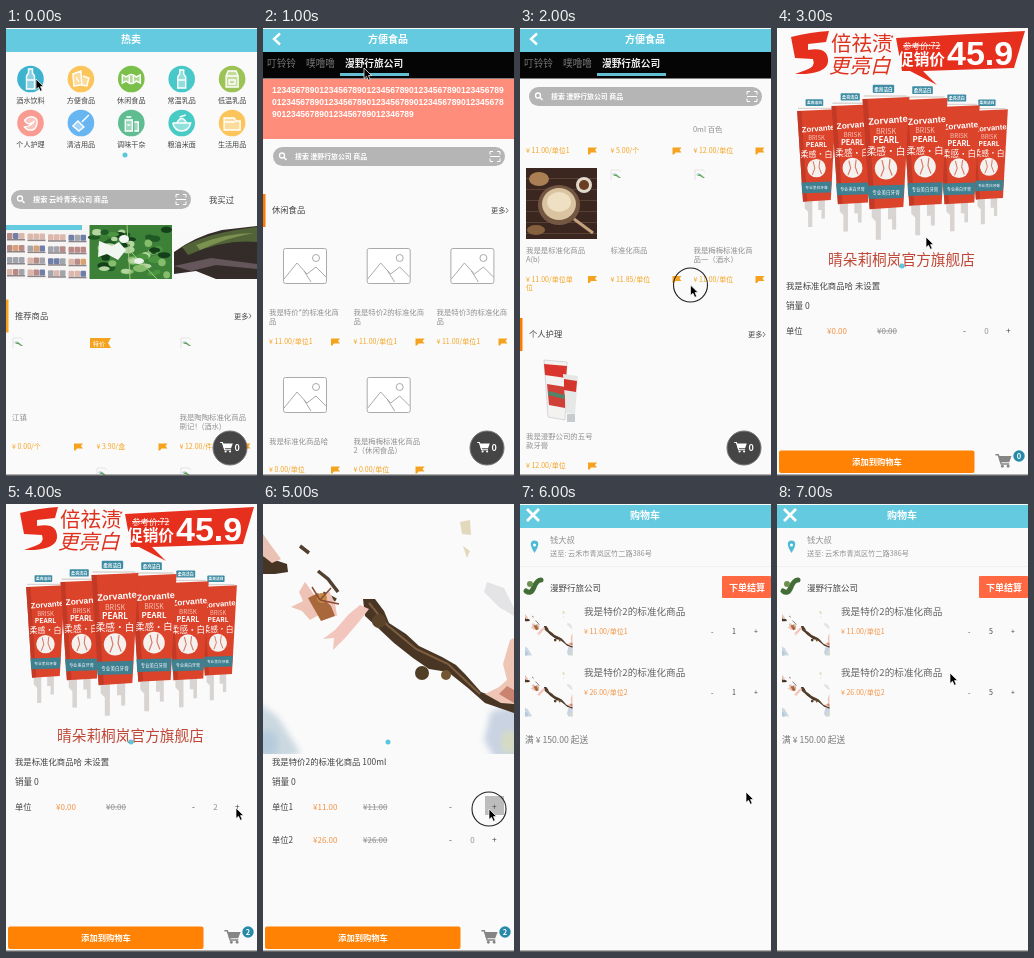
These frames come from a looping animation (251 px wide and 448 px high, 8000 ms). An HTML page:

```html
<!DOCTYPE html>
<html lang="zh">
<head>
<meta charset="utf-8">
<style>
html, body { margin: 0; width: 100%; height: 100%; overflow: hidden; background: #fafafa; }
svg { display: block; width: 100%; height: 100%; }
text { font-family: "Noto Sans CJK SC", "Noto Sans CJK", sans-serif; white-space: pre; }
.b { font-weight: 700; }
.m { text-anchor: middle; }
.s { text-decoration: line-through; }
.i { font-style: italic; }
.arial { font-family: "Liberation Sans", sans-serif; font-weight: 700; }
</style>
</head>
<body>
<svg id="stage" viewBox="0 0 251 448" preserveAspectRatio="none"></svg>
<script>
const BLUE = '#63cae0', ORANGE = '#f5a31f', INK = '#444', GREY = '#909090';
const COLS = [6, 90.5, 173.5];
const SHOP = '漫野行旅公司';

const text = (x, y, s, size = 8.3, fill = INK, cls = '') =>
  `<text x="${x}" y="${y}" font-size="${size}" fill="${fill}" class="${cls}">${s}</text>`;
const rect = (x, y, w, h, fill, r = 0, more = '') =>
  `<rect x="${x}" y="${y}" width="${w}" height="${h}" rx="${r}" fill="${fill}" ${more}/>`;
const dot = (x, y, r, fill, more = '') => `<circle cx="${x}" cy="${y}" r="${r}" fill="${fill}" ${more}/>`;
const oval = (x, y, rx, ry, fill, more = '') =>
  `<ellipse cx="${x}" cy="${y}" rx="${rx}" ry="${ry}" fill="${fill}" ${more}/>`;
const fill = (d, color, more = '') => `<path d="${d}" fill="${color}" ${more}/>`;
const line = (d, color, w = 1, more = '') =>
  `<path d="${d}" fill="none" stroke="${color}" stroke-width="${w}" ${more}/>`;
const at = (x, y, s, k = 1) => `<g transform="translate(${x} ${y}) scale(${k})">${s}</g>`;
const range = (n, f) => Array.from({ length: n }, (_, i) => f(i)).join('');

// Small seeded generator for the textured pictures
function random(seed) {
  return () => (seed = (seed * 16807) % 2147483647) / 2147483647;
}

const cursor = (x, y) => at(x, y,
  fill('M0 0V10.5L2.5 8.3 4.3 12.3 6.2 11.4 4.5 7.6H7.6Z', '#000', 'stroke="#fff" stroke-width=".7"'));
const click = (x, y) => dot(x, y, 17, 'none', 'stroke="#222" stroke-width="1.1"') + cursor(x, y);
const trolley = (x, y, color, k = 1) => at(x, y,
  line('M-7-5H-4.500L-2 3H5', color, 1.2) + fill('M-4.500-4H7L5 1.500H-3Z', color) +
  dot(-1, 5, 1.2, color) + dot(4, 5, 1.2, color), k);
const flag = (x, y) => fill(`M${x} ${y}h9l-2 2.500 2 2.500h-6l-1.500 2h-1.500z`, ORANGE);
const broken = (x, y) => at(x, y,
  line('M0 10V0H8L10 2', '#d4d4d4', .6) + fill('M1 5Q3 1 6 5Z', '#b8d0e8') + fill('M2 6 5 4 10 8 8 8 5 6Z', '#63a858'));
const chevron = line('M17 5.500 11 11 17 16.500', '#fff', 2.4);
const cross = line('M7 5 19 17M19 5 7 17', '#fff', 2.8);

const header = (title, icon = '') =>
  rect(0, 1, 251, 23, BLUE) + icon + text(125, 15.3, title, 10, '#fff', 'b m');
const floatingCart = dot(224, 420, 17, '#454545', 'stroke="#777" stroke-width="1"') +
  trolley(220.500, 419, '#fff', .9) + text(228.500, 423.300, '0', 9, '#fff', 'b');

function search(x, y, w, shop, size) {
  const mid = y + 9.5, s = x + w - 10;
  return rect(x, y, w, 19, '#b5b5b5', 9.5) +
    dot(x + 9, mid - 1, 2.5, 'none', 'stroke="#fff" stroke-width="1.3"') +
    line(`M${x + 11} ${mid + 1}l2.500 2.500`, '#fff', 1.4) +
    text(x + 22, mid + 2.6, `搜索 ${shop} 商品`, size, '#fff', 'b') +
    line(`M${s - 5} ${mid - 2}v-3h3m4 0h3v3m0 4v3h-3m-4 0h-3v-3M${s - 5} ${mid}h10`, '#fff', 1);
}

const section = (y, title, color) => rect(0, y, 2.5, 33, color) +
  text(9, y + 19, title) + text(228, y + 19, '更多', 7.2) + line(`M243 ${y + 14}l2 2.500-2 2.500`, INK, .7);

const price = (col, y, s) => text(COLS[col], y, s, 7, ORANGE) + flag(COLS[col] + 62, y - 5.500);
const caption = (col, y, lines) =>
  lines.map((s, i) => text(COLS[col], y + i * 9, s, 7.4, GREY)).join('');

const tabs = rect(0, 24, 251, 26.5, '#050505') +
  text(4, 39, '叮铃铃', 9.7, '#777') + text(43, 39, '噗噜噜', 9.7, '#777') +
  text(82, 39, SHOP, 9.7, '#eee', 'b') + rect(77, 45, 69, 3, '#62bfd4');

const placeholder = (x, y) => at(x, y,
  rect(.5, .5, 43, 35, '#fff', 2, 'stroke="#aaa"') +
  line('M1 31 14 15 24 26 33 19 43 29M21 23 28 34', '#aaa') + dot(33, 10, 3.500, 'none', 'stroke="#aaa"'));

// Category glyphs, centred on the disc
const categories = [
  ['酒水饮料', '#3eb3cf', 'M-2-10H2V-6L4-3V10H-4V-3L-2-6ZM-4 1H4'],
  ['方便食品', '#fbc55c', 'M-8-5 0-8 1 6-7 7ZM2-3 8-1 6 7 1 6M-5-2 -2 3'],
  ['休闲食品', '#7cc04c', 'M-9-4-5-2Q0-7 5-2L9-4V4L5 2Q0 7-5 2L-9 4ZM-2-3V3M2-3V3'],
  ['常温乳品', '#48c8c8', 'M-2-9H2V-5L4-2V9H-4V-2L-2-5ZM-4 1H4'],
  ['低温乳品', '#9dc357', 'M-6-3-4-8H4L6-3V8H-6ZM-6-3H6M-3 1H3V5H-3Z'],
  ['个人护理', '#f99b91', 'M-6-3Q0-9 6-4 8 1 4 6-2 9-6 4 1 3 4-2-3 4-6-3'],
  ['清洁用品', '#67b5f1', 'M8-8 1-1M-3-2 3 4-2 8-8 3Z'],
  ['调味干杂', '#5fbd91', 'M-6-3H1V8H-6ZM-5-6H0M3-1H7V8H3M-4 2H-1'],
  ['粮油米面', '#47cbc4', 'M-9 0H9Q7 8 0 8T-9 0M-5 0Q0-9 5 0M-2-6 4-8'],
  ['生活用品', '#fbc55c', 'M-8-5H2L4-2H8V7H-8ZM-8-1H3']
];
const categoryGrid = categories.map(([name, color, d], i) => {
  const x = 24.5 + (i % 5) * 50.4, row = Math.floor(i / 5);
  return at(x, 51 + row * 44, dot(0, 0, 13.3, color) + line(d, '#fff', 1.4) + fill(d, '#fff', 'opacity=".4"')) +
    text(x, 74.500 + row * 44, name, 7.1, INK, 'm');
}).join('');

function shelves() {
  const r = random(41), colors = ['#b98a86', '#6f7fa8', '#d9a070', '#a3a5ad', '#dcb8ac'];
  return rect(0, 197, 82, 54, '#f6f5f4') + range(4, row => range(4, col => {
    const x = 1 + col * 20.5, y = 205 + row * 12;
    return range(3, i => rect(x + i * 6, y + col * .6, 5.5, 6, colors[Math.floor(r() * 5)], 1)) +
      rect(x, y + 6 + col * .6, 18, 1.5, '#8d8488');
  })) + rect(0, 197, 76, 5, BLUE);
}

function garden() {
  const r = random(9), greens = ['#1f5a24', '#4b9540', '#86bd6d', '#153f1b', '#b3d6a0'];
  return rect(83.500, 197, 82.500, 54, '#3d8038') + range(55, i => {
    const x = 88 + r() * 73, y = 201 + r() * 46;
    return oval(x, y, 3 + r() * 4, 2 + r() * 2, greens[i % 5]);
  }) + line('M121 197 124 251M125 224 151 251', '#a6c882', 1) +
    fill('M93 213 106 218 113 214 120 222 112 232 101 226 92 229Z', '#f2f6f0') +
    oval(118, 211, 5, 4, '#f4f6f4') + oval(133, 233, 5, 3, '#eef3ec');
}

const leafy = rect(167.500, 197, 83.500, 54, '#f9f9f9') +
  fill('M168 224Q190 208 216 202L251 198V251H210L190 243 168 246Z', '#342c29') +
  fill('M176 219Q204 204 251 199V214Q218 211 182 227Z', '#526337') +
  fill('M190 217Q220 205 248 205 220 210 194 222Z', '#7b9150') +
  fill('M168 238 205 230 251 236V241L210 237 185 243Z', '#64565a');

const home = () => header('热卖') + categoryGrid + dot(119, 127, 2.5, '#5bc7df') +
  search(5, 162, 180, '云岭青禾公司', 7.2) + text(203, 174.500, '我买过', 8.4) +
  shelves() + garden() + leafy + section(271.500, '推荐商品', ORANGE) +
  broken(7, 310) + broken(175, 310) + broken(91, 440) + broken(175, 440) +
  fill('M84 310H105L102 315 105 320H84Z', ORANGE) + text(87, 317.500, '特价', 6, '#fff') +
  caption(0, 392, ['江镇']) + caption(2, 392, ['我是陶陶标准化商品', '刷记！(酒水)']) +
  price(0, 421, '¥ 0.00/个') + price(1, 421, '¥ 3.90/盒') + price(2, 421, '¥ 12.00/件') +
  floatingCart + cursor(30, 51);

const digits = ['1234567890123456789012345678901234567890123456789',
  '0123456789012345678901234567890123456789012345678', '901234567890123456789012346789'];
const category = () => header('方便食品', chevron) + tabs + rect(0, 51, 251, 60, '#ff8d7b') +
  digits.map((s, i) => text(9, 65 + i * 12, s, 8.5, '#fff', 'arial')).join('') +
  search(10, 119, 232, SHOP, 6.9) + section(166, '休闲食品', '#ff7b00') +
  range(5, i => placeholder(20 + (i % 3) * 83.700, i < 3 ? 220 : 349)) +
  range(3, i => caption(i, 286.500, [`我是特价${['*', 2, 3][i]}的标准化商`, '品']) + price(i, 316, '¥ 11.00/单位1')) +
  caption(0, 415.500, ['我是标准化商品哈']) + caption(1, 415.500, ['我是梅梅标准化商品', '2（休闲食品）']) +
  price(0, 444, '¥ 0.00/单位') + price(1, 444, '¥ 0.00/单位') + floatingCart + cursor(101, 40);

const breakfast = rect(6, 140, 71, 71, '#3b2720') +
  range(6, i => rect(6, 150 + i * 11, 71, 1, '#5a4033')) +
  oval(39, 177, 21, 20, '#745743') + oval(39, 176, 17, 16, '#d9c3a0') + oval(39, 174, 12, 10, '#efe0c3') +
  oval(64, 157, 8, 8, '#e1d9cc') + oval(64, 157, 5, 5, '#6b3d22') +
  oval(19, 151, 10, 7, '#ab7f54') + line('M54 191 73 205', '#c3a27d', 3) + oval(16, 202, 9, 5, '#87613d');
const carton = fill('M24 332 47 334 45 392 28 389Z', '#f4f2f1', 'stroke="#c6cacc" stroke-width=".7"') +
  fill('M24 336 47 338 46 350 25 347Z', '#d9342d') + fill('M27 356 46 359 45 380 29 377Z', '#cf4038') +
  fill('M43 346 58 348 55 386 46 385Z', '#e6e8e8') + fill('M44 351 57 353 56 364 44 362Z', '#d4362e') +
  rect(47, 386, 8, 8, '#c6ccce') + fill('M28 363 45 367 44 371 28 367Z', '#51856b');

const scrolled = () => header('方便食品', chevron) + text(173, 104, '0ml 百色', 7.4, GREY) +
  rect(150, 78, 100, 20, '#fafafa') + tabs + search(9, 59, 233, SHOP, 6.9) +
  price(0, 125, '¥ 11.00/单位1') + price(1, 125, '¥ 5.00/个') + price(2, 125, '¥ 12.00/单位') +
  breakfast + broken(91, 142) + broken(175, 142) +
  caption(0, 225, ['我是是标准化商品', 'A(b)']) + caption(1, 225, ['标准化商品']) +
  caption(2, 225, ['我是梅梅标准化商', '品一（酒水）']) +
  price(0, 253.500, '¥ 11.00/单位单') + text(6, 262, '位', 7, ORANGE) +
  price(1, 253.500, '¥ 11.85/单位') + price(2, 253.500, '¥ 11.00/单位') +
  section(290, '个人护理', '#ff7b00') + carton + caption(0, 411, ['我是漫野公司的五号', '款牙膏']) +
  price(0, 440, '¥ 12.00/单位') + floatingCart + click(170.500, 257);

// One paste tube, 46 wide, hanging from its flat end
const tube =
  fill('M-14 104H-5V138H-10V120L-14 116ZM2 104H10V128H6V118H2Z', '#d8d4d2') +
  fill('M-23 0 23-2 17 106-16 108Z', '#dc432b') + fill('M-23 0-18 0-11 107-16 108Z', '#c23a26') +
  rect(-13, -14, 21, 8, '#3e8ca3', 1) + text(-2.500, -8, '柔亮洁白', 4.500, '#fff', 'b m') +
  line('M-22-3H20', '#d9d4d2', 1.5) +
  `<g transform="rotate(-5)">${text(0, 24, 'Zorvante', 9.2, '#fff', 'arial m')}</g>` +
  text(0, 34, 'BRISK', 7, '#f6c5b8', 'm') + text(0, 43, 'PEARL', 8, '#fff', 'b m') +
  text(0, 55, '柔感·白', 9.5, '#fff', 'm') +
  dot(0, 68, 11, '#f4f1ef') + line('M-4 60-2 68-5 76M4 59 3 67 6 75', '#d97a66', 1.2) +
  fill('M-18 85 18 84 17 97-17 98Z', '#3e7f90') + text(0, 93, '专业美白牙膏', 4.500, '#fff', 'm');
const tubes = [[39.5, 83, .84], [212, 83, .82], [182, 79, .9], [75.5, 78, .91], [148, 72, .98], [109, 71, 1.02]];

const toothpaste = fill('M14 9Q34 4 52 3L49 14 31 16V22Q52 18 51 34 49 47 18 46L29 42Q39 39 36 31L18 30Z', '#e6301d') +
  text(54, 23, '倍祛渍', 20.500, '#df321e') + text(113, 14, '*', 9, '#df321e') +
  text(52, 45, '更亮白', 20.500, '#df321e', 'i') +
  fill('M119 10 248 3 237 40 146 43 160 57 133 43H125Z', '#e6301d') +
  text(126, 21, '参考价:72', 8.5, '#fff', 's') + text(121, 37, '促销价', 15.700, '#fff', 'b') +
  text(170, 36.500, '45.9', 34, '#fff', 'arial') +
  tubes.map(([x, y, k]) => at(x, y, tube, k)).join('') +
  text(51, 237, '晴朵莉桐岚官方旗舰店', 14.7, '#bf4634');

const soft = 'filter="url(#soft)"';
const blossomPicture = `<defs><filter id="soft"><feGaussianBlur stdDeviation="3"/></filter>
  <clipPath id="frame"><rect width="251" height="250"/></clipPath></defs><g clip-path="url(#frame)">` +
  rect(0, 0, 251, 250, '#fafafa') +
  fill('M-9 196 14 212 38 250-9 262Z', '#cbd8e0', soft) + oval(3, 240, 12, 14, '#b5cbdc', soft) +
  fill('M262 200 228 207 221 236 236 262H262Z', '#c9d3e2', soft) + oval(246, 238, 8, 12, '#d5dcc2', soft) +
  fill('M197 18 207 16 208 31 199 30ZM200 42 207 47 204 54Z', '#e2d8bb') +
  fill('M224 78 241 84 251 104V112L236 103 221 88Z', '#e4e3e6') +
  fill('M0 52 12 56 24 60 25 68 12 70 0 70Z', '#463424') +
  fill('M0 30 7 40 18 55 9 59 0 52Z', '#e9c2b4') +
  line('M55 67 65 75 75 88M37 42 46 49M60 89 73 96', '#514032', 3.5) +
  fill('M100 95 112 95 121 107 126 119 143 130 156 142 179 153 193 161 202 170 218 188 251 200V209L222 199 205 184 185 168 166 165 150 154 131 139 114 123 102 112Z', '#493524') +
  line('M106 99 124 121 153 145 185 160 217 190', '#7d5e40', 2) +
  dot(159, 169, 7, '#513e27') + dot(183, 171, 5, '#735634') + dot(116, 117, 7, '#5b432a') +
  fill('M55 96 42 78 36 88 40 97 28 103 39 107 47 116 59 109 74 112 72 99 66 87Z', '#eec2b4') +
  fill('M72 126 86 110 97 101 106 105 95 119 82 134 70 146 71 134 60 135Z', '#f2c6bd') +
  fill('M45 94 55 89 68 102 72 112 58 117Z', '#a9683c') + dot(59, 94, 5, '#c58a43') +
  line('M57 96 68 84M57 96 76 100M57 96 49 83', '#8a4a35', 1.5) +
  fill('M222 190 236 183 244 176 240 160 247 136 251 134V200L238 199Z', '#efc5b6') +
  fill('M236 190 244 182 251 186V199Z', '#c98370') + '</g>';

function unitRow(y, name, now, before, count) {
  return text(9, y, name) + text(50, y, now, 8, '#f39142') + text(100, y, before, 8, GREY, 's') +
    text(186, y, '-') + text(209.500, y - .5, count, 8, GREY, 'm') + text(229, y, '+');
}
const product = (picture, title, rows, badge) => picture + dot(125, 238, 2.5, '#5bc7df') +
  text(9, 261, title, 8.4) + text(9, 281, '销量 0', 8.6) + rows +
  rect(2, 422.500, 195.500, 22.500, '#ff8205', 2) + text(100, 437, '添加到购物车', 8.3, '#fff', 'b m') +
  trolley(226.500, 432.500, '#858585', 1.15) + dot(242, 428, 5.7, '#278aa8') + text(242, 431, badge, 7.5, '#fff', 'b m');
const paste = (count, pointer) => product(toothpaste, '我是标准化商品哈 未设置',
  unitRow(306, '单位', '¥0.00', '¥0.00', count), count) + pointer;
const blossom = () => product(blossomPicture, '我是特价2的标准化商品 100ml',
  rect(222, 292, 19, 19, '#bcbcbc') + unitRow(306, '单位1', '¥11.00', '¥11.00', '') +
  unitRow(339, '单位2', '¥26.00', '¥26.00', 0), 2) + click(226, 305);

const cartItem = (y, cost, count) => at(5, y, blossomPicture, .19) +
  text(64, y + 6.500, '我是特价2的标准化商品', 9.600, '#666') + text(64, y + 25.500, cost, 7, '#f39142') +
  text(191, y + 25.500, '-', 7) + text(214, y + 25.500, count, 7, INK, 'm') + text(234, y + 25.500, '+', 7);
const cart = (count, x, y) => header('购物车', cross) +
  fill('M14.500 49Q7 37 14.500 36.500 22 37 14.500 49Z', '#50b9d3') + dot(14.500, 41, 1.5, '#fff') +
  text(30, 38.500, '钱大叔', 8.3, GREY) + text(30, 51.500, '送至: 云禾市青岚区竹二路386号', 7.2, GREY) +
  rect(0, 62, 251, 1, '#f0f0f0') +
  line('M6 87Q11 91 14 83 17 76 21 76', '#426d37', 5, 'stroke-linecap="round"') + dot(10, 80, 3, '#6d9052') +
  text(30, 86.500, SHOP, 8.5) + rect(202, 72, 49, 22, '#ff6840', 1) + text(209, 86.500, '下单结算', 9, '#fff', 'b') +
  cartItem(104, '¥ 11.00/单位1', count) + cartItem(165, '¥ 26.00/单位2', count) +
  text(5, 239, '满 ¥ 150.00 起送', 8.7, '#777') + cursor(x, y);

const scenes = [home(), category(), scrolled(), paste(0, cursor(149, 209)),
  paste(2, cursor(230, 304)), blossom(), cart(1, 226, 288), cart(5, 173, 169)];
const stage = document.getElementById('stage');
let shown = -1;

function draw() {
  const index = Math.floor((performance.now() % 8000) / 1000);
  if (index !== shown) {
    shown = index;
    stage.innerHTML = rect(0, 0, 251, 448, '#fafafa') + scenes[index] + rect(0, 446.500, 251, 1.500, '#666');
  }
  requestAnimationFrame(draw);
}
draw();
</script>
</body>
</html>
```
